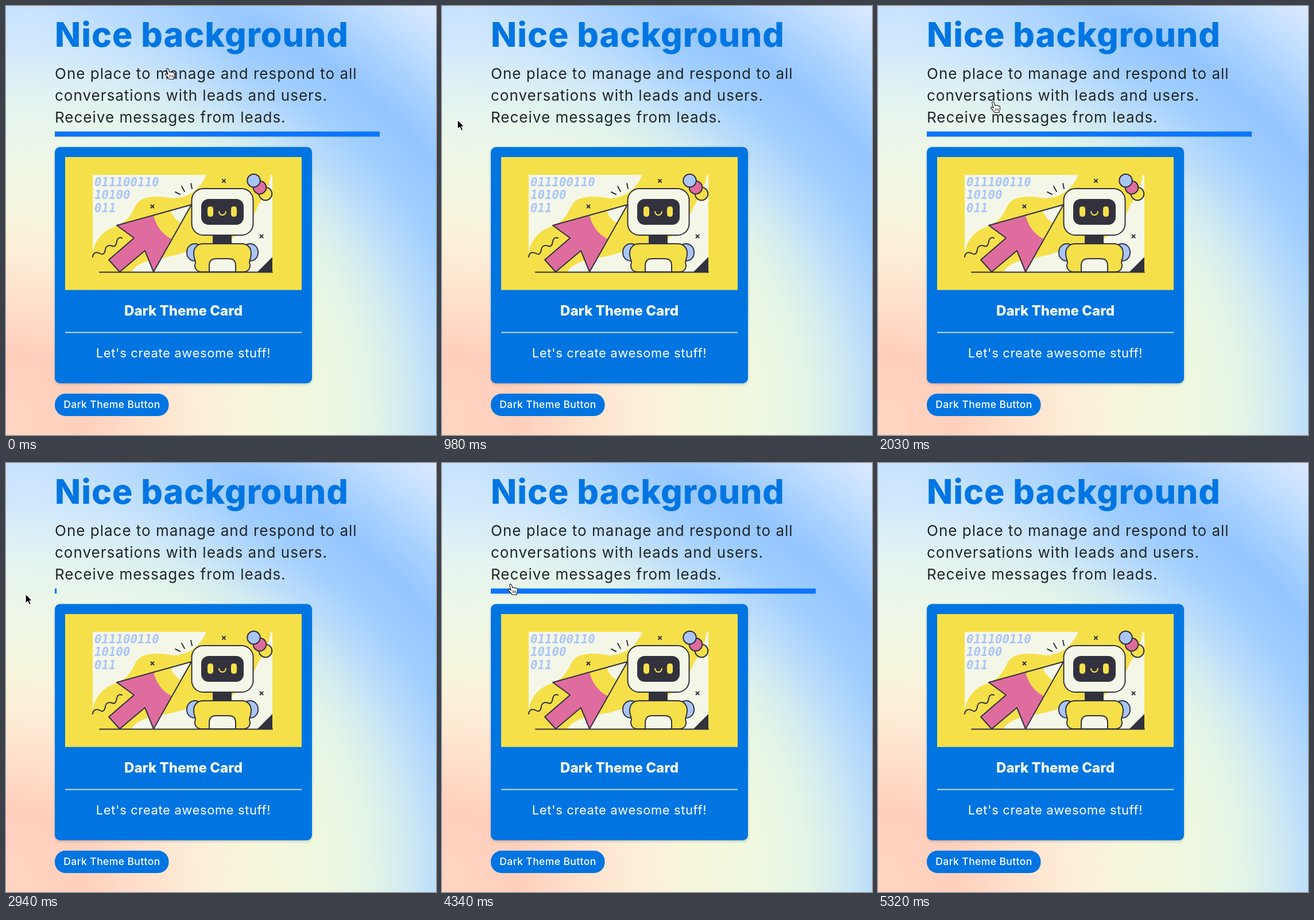
Write an HTML page that moves like this. It is 749 px wide and 747 px high and loops after 5390 ms.

```html
<!DOCTYPE html>
<html lang="en">
<head>
<meta charset="utf-8">
<title>Nice background</title>
<style>
  html, body { margin: 0; width: 100%; height: 100%; overflow: hidden; }
  svg { display: block; width: 100vw; height: 100vh; font-family: Inter, "Open Sans", sans-serif; }
  .title { font-size: 59px; font-weight: 800; letter-spacing: 1px; fill: #0076e2; }
  .lead { font-size: 26px; letter-spacing: 1px; fill: #212529; }
  .light { fill: #fff; text-anchor: middle; }
  .bits { font: italic bold 20.8px "DejaVu Sans Mono", monospace; fill: #a9c5f8; }
  .ink { stroke: #32323f; stroke-width: 2; stroke-linejoin: round; stroke-linecap: round; }
  .line { fill: none; }
  .yellow { fill: #f6e049; }
  .cream { fill: #f4f7e8; }
  .pink { fill: #df6c9e; }
  .blue { fill: #a9c5f8; }
  .dark { fill: #32323f; }
</style>
</head>
<body>
<svg viewBox="0 0 749 747" preserveAspectRatio="none">
  <defs>
    <radialGradient id="sky" gradientUnits="userSpaceOnUse" cx="0" cy="720" r="970" gradientTransform="scale(1.15 1)">
      <stop offset="0" stop-color="#ffd6c3"/>
      <stop offset=".12" stop-color="#ffcfbc"/>
      <stop offset=".19" stop-color="#ffdcc8"/>
      <stop offset=".3" stop-color="#fdeed7"/>
      <stop offset=".38" stop-color="#f7f6da"/>
      <stop offset=".5" stop-color="#eef8e1"/>
      <stop offset=".57" stop-color="#e4f5e7"/>
      <stop offset=".62" stop-color="#d3ecf0"/>
      <stop offset=".67" stop-color="#bddefa"/>
      <stop offset=".74" stop-color="#a0ceff"/>
      <stop offset=".81" stop-color="#94c5ff"/>
      <stop offset=".87" stop-color="#a8d1ff"/>
      <stop offset=".93" stop-color="#c0deff"/>
      <stop offset="1" stop-color="#dce9ff"/>
    </radialGradient>
    <radialGradient id="haze" gradientUnits="userSpaceOnUse" cx="40" cy="20" r="400">
      <stop offset="0" stop-color="#e4f2ff" stop-opacity=".6"/>
      <stop offset="1" stop-color="#e4f2ff" stop-opacity="0"/>
    </radialGradient>
    <filter id="shadow" x="-5%" y="-5%" width="110%" height="112%">
      <feDropShadow dx="0" dy="2" stdDeviation="2" flood-opacity=".18"/>
    </filter>
    <clipPath id="pointerClip">
      <path d="M323 346 193 382 223 404 179 442 198 463 242 426 257 463Z"/>
    </clipPath>
  </defs>

  <rect width="749" height="747" fill="url(#sky)"/>
  <rect width="749" height="747" fill="url(#haze)"/>
  <text class="title" x="85" y="71">Nice background</text>
  <g class="lead">
    <text x="85" y="127">One place to manage and respond to all</text>
    <text x="85" y="165">conversations with leads and users.</text>
    <text x="85" y="203">Receive messages from leads.</text>
  </g>
  <rect id="bar" x="85" y="218.5" height="9" fill="#0d74fc"/>

  <rect x="85" y="245.5" width="448" height="411.5" rx="9" fill="#0075e1" filter="url(#shadow)"/>
  <rect class="yellow" x="103" y="263" width="412" height="231.5"/>

  <g id="art">
    <path class="cream" d="M151 294H349C340 316 321 334 292 335C265 330 238 330 228 344C219 358 217 374 190 384C170 391 154 406 151 432Z"/>
    <path class="cream" d="M218 463C232 442 262 441 290 435C318 429 340 414 372 412C405 408 428 376 438 350C450 330 459 314 461 294H464V463Z"/>
    <g class="bits">
      <text x="154" y="314">011100110</text>
      <text x="154" y="335.5">10100</text>
      <text x="154" y="358.5">011</text>
    </g>

    <g clip-path="url(#pointerClip)">
      <rect class="yellow" x="170" y="340" width="160" height="130"/>
      <path class="pink" d="M257 365C262 384 273 398 289 406L262 470H170V340H250Z"/>
      <path class="cream" d="M287 357Q292 371 305 378L330 350V340Z"/>
    </g>
    <path class="ink line" d="M323 346 193 382 223 404 179 442 198 463 242 426 257 463Z"/>
    <path class="ink line" d="M151 437C152 428 159 428 164 431S172 431 173 424S180 416 185 418S192 416 193 410S198 402 202 404"/>
    <path class="ink line" d="M295 324 303 328M306 314 311 323M322 309 324 318"/>
    <path class="ink line" d="M377 302l5 5m0-5l-5 5M252.500 346.500l5 5m0-5l-5 5M442.500 398.500l5 5m0-5l-5 5"/>

    <g class="ink">
      <circle class="yellow" cx="452" cy="327" r="11.3"/>
      <circle class="pink" cx="442" cy="316" r="11.3"/>
      <circle class="blue" cx="431.500" cy="304" r="11.3"/>
      <path class="dark" d="M464 437V463H438Z" stroke="none"/>
      <rect class="blue" x="315" y="414" width="28" height="30" rx="14"/>
      <rect class="blue" x="411" y="414" width="28" height="30" rx="14"/>
      <rect class="dark" x="361" y="398" width="31" height="17"/>
      <path class="yellow" d="M344 414H410C421 414 427 421 427 431C427 439 424 442 424 447C427 455 423 463 413 463H341C331 463 327 455 330 447C330 442 327 439 327 431C327 421 333 414 344 414Z"/>
      <path class="cream" d="M354 463V452Q354 440 366 440H388Q400 440 400 452V463Z"/>
      <rect class="cream" x="323.500" y="318" width="107" height="81" rx="20"/>
    </g>
    <rect class="dark" x="340" y="336" width="74" height="45" rx="13"/>
    <rect class="yellow" x="351" y="349" width="10" height="18" rx="4.500"/>
    <rect class="yellow" x="392" y="349" width="10" height="18" rx="4.500"/>
    <path class="line" d="M371 358Q372 364 377 364T383 358" stroke="#f6e049" stroke-width="2" stroke-linecap="round"/>
    <path class="ink line" d="M163 463.500H464"/>
  </g>

  <text class="light" x="309" y="539" font-size="24" font-weight="800">Dark Theme Card</text>
  <rect x="103" y="567.500" width="412" height="2" fill="#c5ddf6"/>
  <text class="light" x="309" y="612" font-size="22" letter-spacing=".6">Let's create awesome stuff!</text>
  <rect x="85" y="675" width="198.500" height="39" rx="18.500" fill="#0075e1"/>
  <text class="light" x="184.500" y="700" font-size="17.500" font-weight="500" letter-spacing=".4">Dark Theme Button</text>

  <g id="arrow">
    <path d="M0 0V16.500L4 13 6.700 19 9.600 17.700 7 12H12Z" fill="#000" stroke="#fff" stroke-width="1.300" stroke-linejoin="round"/>
  </g>
  <g id="hand" stroke="#222" stroke-width="1.200" stroke-linejoin="round" stroke-linecap="round">
    <path d="M-1.500 1.500C-1-.8 1.500-.6 2.200 1.500L4 6.500C5 5.300 6.600 5.600 7 6.700C8 5.700 9.600 6 10 7.200C11.300 6.700 12.400 7.700 12.500 9C13 12 12.500 14 11.200 16V18.500H3.200C2.200 15.800-.5 14-3 11.300C-4.300 9.600-2.600 8.200-.8 9.300L1.200 10.600Z" fill="#fff"/>
    <path d="M4.500 11.500V15M7 11.500V15M9.500 11.500V15" fill="none" stroke-width="1"/>
  </g>
</svg>

<script>
const LOOP = 5390, STEP = 70, BAR_WIDTH = 566, EASE_MS = 500, LEFT_EDGE = 85;
const [bar, arrow, hand] = ["bar", "arrow", "hand"].map(id => document.getElementById(id));

// time, x, y of the cursor tip
const path = [
  [0, 281, 109], [350, 85, 172], [650, 32, 194], [980, 27, 198],
  [1300, 85, 186], [1700, 222, 158], [2030, 200, 167], [2490, 85, 216],
  [2700, 42, 230], [2940, 34, 228], [3150, 85, 205], [3570, 255, 160],
  [3850, 262, 160], [4340, 119, 211], [4430, 85, 221], [4800, -30, 245], [5390, -40, 245]
];
// alternating leave and enter times
const crossings = [350, 1300, 2490, 3150, 4430];

const clamp = v => Math.min(1, Math.max(0, v));
const bezier = (a, b, s) => 3 * a * s * (1 - s) ** 2 + 3 * b * s * s * (1 - s) + s ** 3;

// CSS "ease": cubic-bezier(.25, .1, .25, 1)
function ease(p) {
  let low = 0, high = 1;
  for (let i = 0; i < 24; i++) {
    const mid = (low + high) / 2;
    if (bezier(.25, .25, mid) < p) low = mid; else high = mid;
  }
  return bezier(.1, 1, high);
}

function slope(i, axis) {
  const a = path[Math.max(0, i - 1)], b = path[Math.min(path.length - 1, i + 1)];
  return (b[axis] - a[axis]) / (b[0] - a[0]);
}

function cursorAt(t) {
  const i = path.findIndex((p, n) => n === path.length - 2 || t < path[n + 1][0]);
  const a = path[i], b = path[i + 1], span = b[0] - a[0], s = (t - a[0]) / span;
  return [1, 2].map(axis =>
    a[axis] * (1 + 2 * s) * (1 - s) ** 2 + b[axis] * s * s * (3 - 2 * s) +
    span * (slope(i, axis) * s * (1 - s) ** 2 - slope(i + 1, axis) * s * s * (1 - s)));
}

function barAt(t) {
  let share = 1;
  crossings.forEach((start, i) => {
    if (t < start) return;
    const e = ease(clamp((t - start) / EASE_MS));
    share = i % 2 ? e : 1 - e;
  });
  return share * BAR_WIDTH;
}

function draw(now) {
  const t = Math.floor(now % LOOP / STEP) * STEP;
  const [x, y] = cursorAt(t), inside = x >= LEFT_EDGE;
  for (const [cursor, shown] of [[hand, inside], [arrow, !inside]]) {
    cursor.setAttribute("transform", `translate(${x.toFixed(1)} ${y.toFixed(1)})`);
    cursor.setAttribute("visibility", shown ? "visible" : "hidden");
  }
  bar.setAttribute("width", barAt(t).toFixed(2));
}

const begin = performance.now();
function tick() {
  draw(performance.now() - begin);
  requestAnimationFrame(tick);
}
tick();
</script>
</body>
</html>
```
